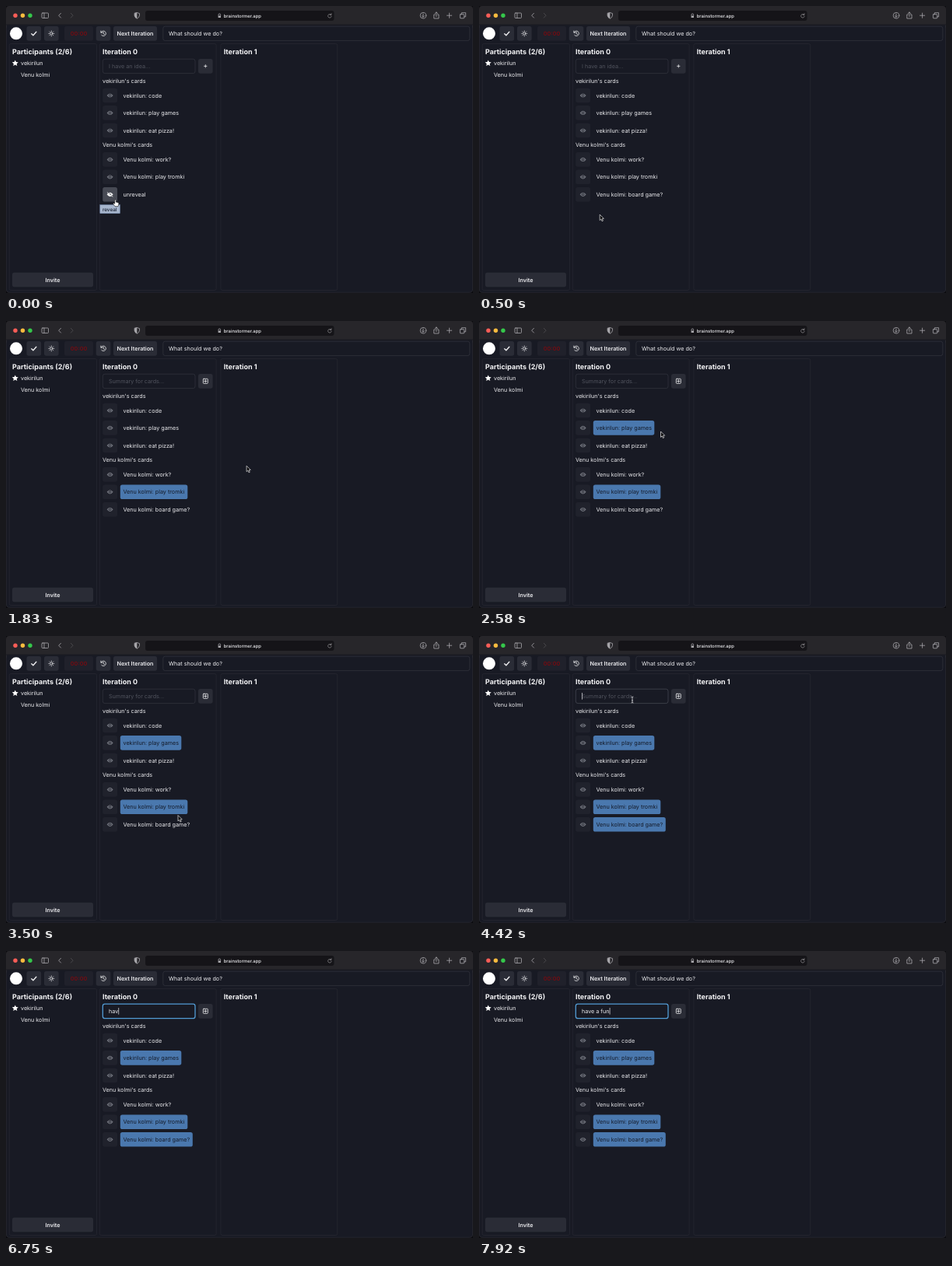
Animation, 600 px wide and 369 px high, one loop 8 s. Source, as an HTML page:

```html
<!DOCTYPE html>
<html lang="en">
<head>
<meta charset="utf-8">
<title>Brainstorm board</title>
<style>
  html, body { margin: 0; width: 100%; height: 100%; overflow: hidden; background: #0b0b0f; }
  svg { display: block; }
  text { font: 400 7.2px Inter, sans-serif; fill: #ececef; text-rendering: geometricPrecision; white-space: pre; }
  .heading { font-size: 9px; font-weight: 700; fill: #f4f4f6; }
  .strong { font-weight: 600; text-anchor: middle; }
  .button { fill: #2a2c36; }
  .panel { fill: none; stroke: #262831; stroke-width: .8; }
  .field { fill: none; stroke: #343640; stroke-width: .7; }
  .line { fill: none; stroke: #a9a8ac; stroke-width: .8; stroke-linecap: round; stroke-linejoin: round; }
  .white { stroke: #f0f0f2; }
  .hint { fill: #50535d; }
</style>
</head>
<body>
<svg width="600" height="369" viewBox="0 0 600 369">
  <defs>
    <g id="eye">
      <path d="M-4 0Q0-5.2 4 0Q0 5.2-4 0Z"/>
      <circle r="1.75" fill="#20222c"/>
      <circle r="1"/>
    </g>
  </defs>

  <!-- browser window -->
  <rect width="600" height="30" rx="4" fill="#27262a"/>
  <path d="M0 24H599.6V364Q599.6 368.3 595.5 368.3H4Q.4 368.3.4 364V24Z" fill="#181a24" stroke="#34353c" stroke-width=".6"/>
  <path d="M0 24H600" stroke="#101015" stroke-width=".7"/>
  <circle cx="12" cy="12.2" r="2.7" fill="#fb5d57"/>
  <circle cx="21.5" cy="12.2" r="2.7" fill="#fcbc3f"/>
  <circle cx="31" cy="12.2" r="2.7" fill="#35c84b"/>
  <rect x="179" y="6" width="242.5" height="13" rx="3" fill="#151418"/>
  <g class="line">
    <rect x="46" y="9" width="8.5" height="6.5" rx="1"/>
    <path d="M49 9V15.5M70.5 9.3L67.7 12.2L70.5 15.1"/>
    <path d="M83.3 9.3L86.1 12.2L83.3 15.1" stroke="#515054"/>
    <path d="M168.3 8.5L171.5 9.6V12.2Q171.2 14.8 168.3 16.2Q165.4 14.8 165.1 12.2V9.6Z"/>
    <path d="M168.3 8.5V16.2Q165.4 14.8 165.1 12.2V9.6Z" fill="#a9a8ac" stroke="none"/>
    <path d="M273 12.4V11.2A1.3 1.3 0 0 1 275.6 11.2V12.4"/>
    <rect x="272.6" y="12.5" width="3.4" height="2.6" rx=".4" fill="#a9a8ac" stroke="none"/>
    <path d="M417.7 11.3A2.3 2.3 0 1 0 418.2 13.2M416.2 11.4H418V9.7" stroke-width=".6"/>
    <circle cx="536" cy="12.2" r="3.8"/>
    <path d="M536 10V14.2M534.4 12.7L536 14.3L537.6 12.7"/>
    <path d="M551.2 11H549.8V16H556V11H554.6M552.9 13.5V8M551.3 9.5L552.9 7.9L554.5 9.5"/>
    <path d="M566.5 12.2H572.7M569.6 9.1V15.3"/>
    <path d="M585.3 10.6V8.7H590.6V13.8H588.8"/>
    <rect x="583.4" y="10.7" width="5.3" height="5.1" rx=".6"/>
  </g>
  <text x="279.7" y="14.7" style="font-size:5.9px;font-weight:500">brainstormer.app</text>

  <!-- toolbar -->
  <circle cx="13" cy="35.3" r="8" fill="#fff"/>
  <g class="button">
    <rect x="26.5" y="26" width="18.7" height="18.7" rx="2.7"/>
    <rect x="49" y="26" width="18.7" height="18.7" rx="2.7"/>
    <rect x="75" y="26" width="37" height="18.7" rx="2.7" fill="#20212b"/>
    <rect x="115.7" y="26" width="18.7" height="18.7" rx="2.7"/>
    <rect x="138" y="26" width="56" height="18.7" rx="2.7"/>
    <rect x="8" y="342.8" width="104" height="18.4" rx="2.7"/>
    <rect x="247" y="68" width="18.6" height="18.7" rx="2.7"/>
  </g>
  <g class="line white">
    <path d="M32.8 35.7L34.9 37.8L38.9 33.2" stroke-width="1.3"/>
    <circle cx="58.3" cy="35.4" r="1.6"/>
    <path id="rays" stroke-width=".7"/>
    <path d="M122.2 34A3.2 3.2 0 1 1 122.7 37.4M121.9 32V34.2H124.1M125.2 33.6V35.6L126.5 36.4"/>
  </g>
  <text class="strong" x="93.5" y="38" style="fill:#740c12">00:00</text>
  <text class="strong" x="166" y="38">Next Iteration</text>
  <rect class="field" x="201.8" y="26.2" width="394" height="18.4" rx="2.7"/>
  <text x="209" y="38">What should we do?</text>

  <!-- columns -->
  <rect class="panel" x="4.3" y="48.5" width="112.2" height="317" rx="2"/>
  <rect class="panel" x="120.3" y="48.5" width="149.8" height="317" rx="2"/>
  <rect class="panel" x="275.9" y="48.5" width="149.8" height="317" rx="2"/>
  <text class="heading" x="8" y="61.8">Participants (2/6)</text>
  <text class="heading" x="124" y="61.8">Iteration 0</text>
  <text class="heading" x="279.7" y="61.8">Iteration 1</text>
  <path d="M11.8 69.4L13 72L15.8 72.3L13.7 74.2L14.3 77L11.8 75.6L9.3 77L9.9 74.2L7.8 72.3L10.6 72Z" fill="#fff"/>
  <text x="19" y="76.1">vekirilun</text>
  <text x="19" y="91.2">Venu kolmi</text>
  <text class="strong" x="60" y="354.7">Invite</text>

  <!-- idea field -->
  <rect id="field" class="field" x="124.3" y="68.2" width="118.7" height="18.4" rx="2.7"/>
  <text id="entry" x="132" y="80"></text>
  <rect id="caret" y="73" width=".7" height="8.6" fill="#e6e7ea"/>
  <path class="line white" d="M254.6 77.3H258M256.3 75.6V79"/>
  <rect id="plusBox" class="line white" x="253.3" y="74.3" width="6" height="6" rx=".8"/>
  <text x="124" y="98.8">vekirilun's cards</text>
  <text x="124" y="181.2">Venu kolmi's cards</text>
  <g id="cards"></g>

  <g id="tooltip">
    <rect x="120.8" y="255.7" width="25.6" height="11" fill="#a6b5cc" stroke="#7890b5" stroke-width=".5"/>
    <text x="123.9" y="263.6" style="font-size:6.4px;font-weight:500;fill:#1a2233">reveal</text>
  </g>

  <!-- pointer shapes, hot spot at the origin -->
  <g id="pointer" stroke-linejoin="round">
    <path id="hand" d="M-.8.4Q0-.5.8.4V3L3.6 3.8Q4.6 4.2 4.4 5.4L3.6 8.6H-.4L-2.8 5.4Q-2.8 4.2-1.6 4.6L-.8 5.2Z" fill="#fff" stroke="#111" stroke-width=".6"/>
    <path id="arrow" d="M0 0V7.4L1.7 5.9L2.9 8.6L4.2 8L3 5.4L5.2 5.2Z" fill="#0a0a0c" stroke="#e8e8ea" stroke-width=".7"/>
    <path id="beam" d="M-1.4-4Q0-4 0-3V3Q0 4-1.4 4M1.4-4Q0-4 0-3M0 3Q0 4 1.4 4M-.8.9H.8" fill="none" stroke="#d8d9dc" stroke-width=".8"/>
  </g>
</svg>

<script>
const LOOP = 8000;
const REVEAL = 130, FOCUS = 4420, TYPE_START = 6250, TYPE_STEP = 175;
const typed = 'have a fun';

// y centre, label, selected width, time of selection
const cards = [
  [115, 'vekirilun: code'],
  [137.4, 'vekirilun: play games', 78.5, 2290],
  [160, 'vekirilun: eat pizza!'],
  [197.4, 'Venu kolmi: work?'],
  [219.8, 'Venu kolmi: play tromki', 86.5, 1400],
  [242.3, 'Venu kolmi: board game?', 93, 3830],
];
// time, x, y of the pointer
const path = [
  [0, 140.5, 249], [270, 140.5, 249], [640, 162, 277], [1080, 205.5, 223],
  [1450, 205.5, 223], [1780, 314, 190], [2080, 250, 141], [2240, 213, 138],
  [2380, 213, 138], [2580, 233.5, 142], [2920, 240, 206], [3250, 230, 226],
  [3500, 221, 230.5], [3740, 221, 238], [3900, 221, 238], [4320, 197, 82],
];

const $ = id => document.getElementById(id);
const show = (node, on) => node.setAttribute('visibility', on ? 'visible' : 'hidden');

$('rays').setAttribute('d', Array.from({ length: 8 }, (_, i) => {
  const c = Math.cos(i * Math.PI / 4), s = Math.sin(i * Math.PI / 4);
  return `M${58.3 + 2.8 * c} ${35.4 + 2.8 * s}l${c * .7} ${s * .7}`;
}).join(''));

$('cards').innerHTML = cards.map(([y, label, width = 0]) => `<g>
  <rect x="124.2" y="${y - 9.3}" width="18.8" height="18.6" rx="2.7" fill="#20222c"/>
  <use href="#eye" x="133.6" y="${y}" fill="#72757e"/>
  <rect class="mark" x="146.8" y="${y - 9.3}" width="${width}" height="18.6" rx="2.7" fill="#4a78ae"/>
  <text x="150.5" y="${y + 2.6}">${label}</text></g>`).join('') +
  `<g id="hidden"><rect x="124.2" y="233" width="18.8" height="18.6" rx="2.7" fill="#474a54"/>
  <path d="M129.6 242.3Q133.6 237.1 137.6 242.3Q133.6 247.5 129.6 242.3Z" fill="#fff"/>
  <circle cx="133.9" cy="242.3" r="1" fill="#474a54"/>
  <path d="M130.6 239.3L137.2 244.6" stroke="#474a54" stroke-width=".7"/>
  <path d="M129.9 239.5L137.3 245.3" stroke="#fff" stroke-width=".8"/></g>`;
const rows = [...$('cards').children].slice(0, cards.length).map(row => ({
  mark: row.querySelector('.mark'), text: row.querySelector('text'),
}));

function pointerAt(t) {
  const next = path.findIndex(p => p[0] > t);
  if (next < 0) return path.at(-1).slice(1);
  const [t0, x0, y0] = path[next - 1], [t1, x1, y1] = path[next];
  const u = (t - t0) / (t1 - t0), k = u * u * (3 - 2 * u);
  return [x0 + (x1 - x0) * k, y0 + (y1 - y0) * k];
}

function render(t) {
  const revealed = t >= REVEAL;
  show($('hidden'), !revealed);
  show($('tooltip'), !revealed);
  cards.forEach(([, label, , at = Infinity], i) => {
    const { mark, text } = rows[i];
    show(mark, t >= at);
    text.style.fill = t >= at ? '#141a28' : '';
    text.textContent = i === 5 && !revealed ? 'unreveal' : label;
  });

  const summary = t >= cards[4][3];
  const count = Math.max(0, Math.min(typed.length, Math.floor((t - TYPE_START) / TYPE_STEP) + 1));
  const entry = $('entry');
  entry.textContent = count ? typed.slice(0, count) : summary ? 'Summary for cards...' : 'I have an idea...';
  entry.setAttribute('class', count ? '' : 'hint');
  show($('plusBox'), summary);

  const glow = Math.max(0, Math.min(1, (t - FOCUS) / 200));
  const mix = (a, b) => Math.round(a + (b - a) * glow);
  const base = t >= 4300 ? 74 : 52;
  $('field').style.stroke = `rgb(${mix(base, 82)},${mix(base + 2, 155)},${mix(base + 12, 212)})`;
  $('field').style.strokeWidth = .7 + .6 * glow;

  const blinkOn = (t - FOCUS + 20) % 1000 < 500;
  show($('caret'), t >= FOCUS - 20 && (count || blinkOn));
  $('caret').setAttribute('x', 132 + (count ? entry.getComputedTextLength() + .2 : 0));

  const [x, y] = pointerAt(t);
  $('pointer').setAttribute('transform', `translate(${x} ${y})`);
  const overButton = x < 143.5 && y < 252, overField = y < 88;
  show($('hand'), overButton);
  show($('beam'), overField && !count);
  show($('arrow'), !overButton && !overField);
}

const start = performance.now();
function tick() {
  render((performance.now() - start) % LOOP);
  requestAnimationFrame(tick);
}
tick();
</script>
</body>
</html>
```
